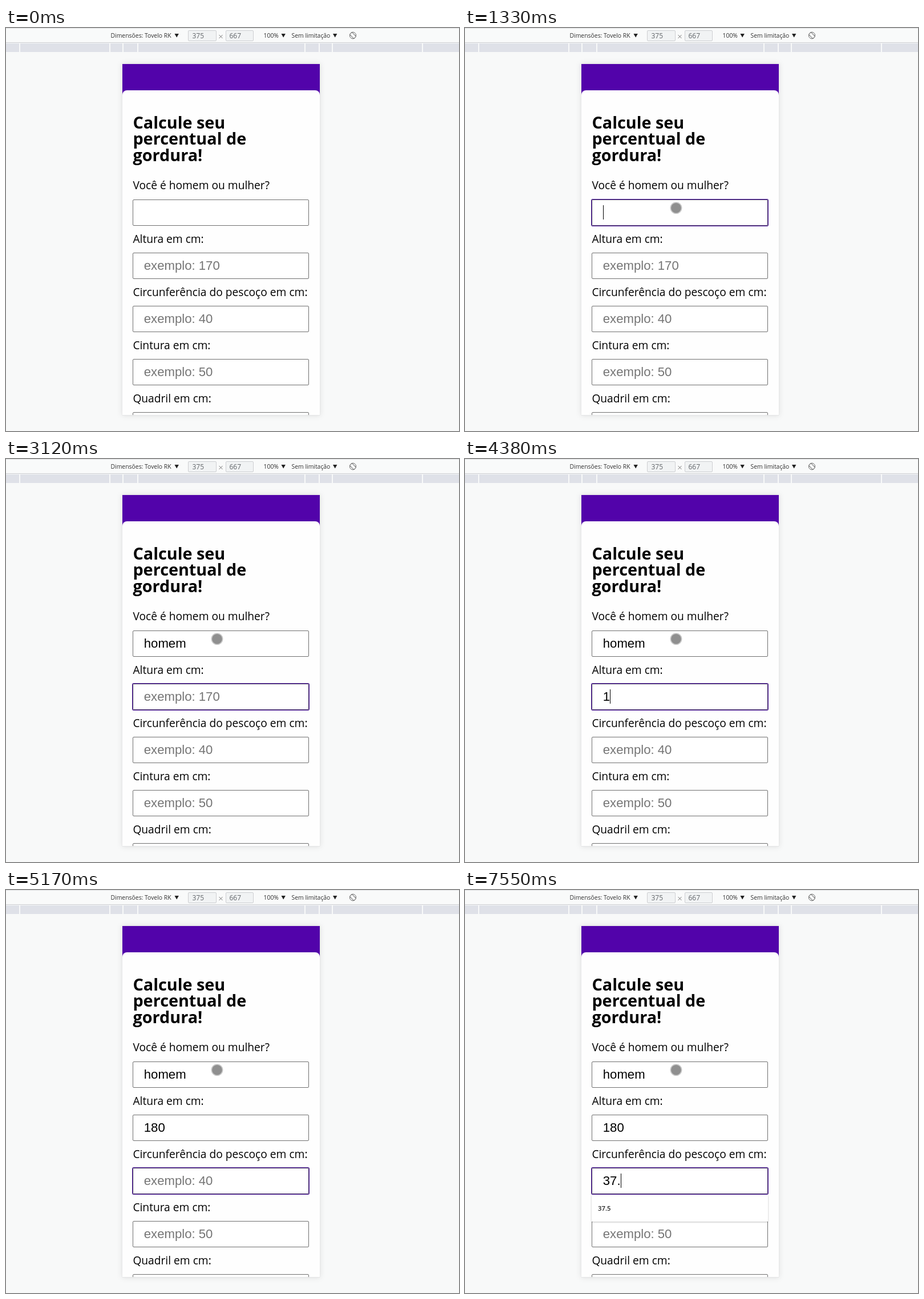
An HTML page that plays this animation: 794x705 px, repeating every 8000 ms.

```html
<!DOCTYPE html>
<html lang="pt">
<head>
<meta charset="utf-8">
<title>Percentual de gordura</title>
<style>
  html, body { margin: 0; width: 794px; height: 705px; overflow: hidden; background: #f8f9f9; }
  svg { display: block; }
  text { white-space: pre; }
  .bar, .hint { font-family: "Open Sans", sans-serif; }
  .bar { font-size: 10.4px; fill: #333; }
  .size { font-size: 12px; fill: #62666a; }
  .title { font: 700 28.8px "Open Sans", sans-serif; }
  .label { font: 400 19.2px "Open Sans", sans-serif; }
  .value { font: 400 22.15px "Liberation Sans", Arial, sans-serif; }
  .hint { font-size: 11.3px; font-weight: 600; fill: #222; }
  .phone { filter: drop-shadow(0 0 5px rgba(0, 0, 0, .11)); }
  .popup { filter: drop-shadow(0 1px 1.5px rgba(0, 0, 0, .25)); }
</style>
</head>
<body>
<svg id="stage" width="794" height="705" viewBox="0 0 794 705">
  <defs><clipPath id="screen"><path d="M204 63H550V677H204Z"/></clipPath></defs>
  <g id="toolbar">
    <path d="M0 0H794V25H0Z" fill="#f9fafa"/>
    <path d="M0 .5H794" stroke="#dfe1e3"/>
    <path d="M0 25.5H794" stroke="#cbcdd1"/>
    <path d="M0 27H794V42H0Z" fill="#dfe1e8"/>
    <g fill="#f1f3f4" stroke="#cdcfd2">
      <rect x="319.5" y="4.5" width="49" height="18" rx="1.5"/>
      <rect x="385.5" y="4.5" width="48" height="18" rx="1.5"/>
    </g>
    <g class="bar">
      <text x="183.5" y="17">Dimensões: Tovelo RK</text>
      <text x="451.5" y="17">100%</text>
      <text x="500.5" y="17">Sem limitação</text>
      <text class="size" x="326.5" y="17.5">375</text>
      <text class="size" x="391.5" y="17.5">667</text>
    </g>
    <path d="M373.5 12l6 6m0-6l-6 6" stroke="#777"/>
    <g fill="none" stroke="#6b6b6b">
      <path d="M604.8 8.2a5.6 5.6 0 0 1 8.6 6M611.2 17.8a5.6 5.6 0 0 1-8.6-6"/>
      <rect x="605.2" y="7.7" width="5.6" height="10.6" rx="1" transform="rotate(-45 608 13)"/>
    </g>
  </g>
  <path class="phone" d="M204 63H550V677.5H204Z" fill="#fff" stroke="#e4e5e6"/>
  <g id="page" clip-path="url(#screen)">
    <path d="M204 63H550V120H204Z" fill="#5203aa"/>
    <path d="M204 678V117a8 8 0 0 1 8-8H542a8 8 0 0 1 8 8V678Z" fill="#fefefe"/>
    <g class="title">
      <text x="222.4" y="176">Calcule seu</text>
      <text x="222.4" y="204">percentual de</text>
      <text x="222.4" y="233">gordura!</text>
    </g>
  </g>
</svg>
<script>
const LOOP = 8000, PITCH = 93, TOP = 300, LEFT = 241.8;
const stage = document.getElementById("stage");
const page = document.getElementById("page");

function add(parent, tag, attrs, text) {
  const el = document.createElementNS("http://www.w3.org/2000/svg", tag);
  for (const k in attrs) el.setAttribute(k, attrs[k]);
  if (text) el.textContent = text;
  parent.appendChild(el);
  return el;
}
function set(el, attrs) {
  for (const k in attrs) el.setAttribute(k, attrs[k]);
}
const show = (el, on) => el.setAttribute("visibility", on ? "visible" : "hidden");
// last row whose first item, a time, has been reached
const at = (rows, t) => rows.filter(r => r[0] <= t).pop();

const toolbar = document.getElementById("toolbar");
for (const x of [23, 181, 204, 230, 523, 548, 571, 729])
  add(toolbar, "rect", { x, y: 27, width: 2, height: 15, fill: "#f8f9f9" });
for (const x of [295.5, 482.5, 573])
  add(toolbar, "path", { d: `M${x} 10h7.4l-3.7 6.6z`, fill: "#222" });

const labels = ["Você é homem ou mulher?", "Altura em cm:",
  "Circunferência do pescoço em cm:", "Cintura em cm:", "Quadril em cm:"];
const holders = ["", "exemplo: 170", "exemplo: 40", "exemplo: 50", ""];
const fields = labels.map((label, i) => {
  const y = TOP + i * PITCH;
  add(page, "text", { class: "label", x: 222.4, y: i ? y - 17 : 282 }, label);
  add(page, "rect", { x: 222.5, y: y + .5, width: 308, height: 45, rx: 1.5, fill: "#fff", stroke: "#707070" });
  return add(page, "text", { class: "value", x: LEFT, y: y + 30 });
});

const ring = add(page, "g", {});
add(ring, "rect", { x: 221.5, y: 299.5, width: 310, height: 47, rx: 1.5, fill: "none", stroke: "#5b2aa6" });
add(ring, "rect", { x: 222.5, y: 300.5, width: 308, height: 45, rx: 1, fill: "none", stroke: "#3d2a5c" });
const caret = add(page, "rect", { width: 1, height: 25, fill: "#000" });

const popup = add(stage, "g", {});
const sheet = add(popup, "rect", { class: "popup", x: 222, width: 309, rx: 1, fill: "#fff" });
const hints = Array.from({ length: 5 }, () => add(popup, "text", { class: "hint", x: 233 }));
const dot = add(stage, "circle", { r: 9.7, fill: "#8f8f8f", stroke: "#c9c9c9", "stroke-width": 1.7 });

// time, field with focus
const focus = [[0, -1], [1330, 0], [2660, 1], [4710, 2]];
// time, text, one list per field
const typed = [
  [[0, ""], [1400, "h"], [2060, "ho"], [2260, "hom"], [2400, "home"], [2460, "homem"]],
  [[0, ""], [4380, "1"], [4510, "18"], [4580, "180"]],
  [[0, ""], [6880, "3"], [7010, "37"], [7480, "37."]]
];
// time, caret shown
const blink = [[0, 0], [1330, 1], [1860, 0], [2060, 1], [3120, 0], [3650, 1], [4120, 0],
  [4380, 1], [5170, 0], [5690, 1], [6160, 0], [6690, 1]];
// time, suggestions, opacity
const lists = [[0, "", 0], [1530, "homem", 1], [2530, "homem", .5], [2600, "", 0],
  [4450, "180 182 170 175 178", 1], [4510, "180 182", 1], [4580, "180 182", .5], [4640, "", 0],
  [7010, "37.5 37", 1], [7550, "37.5", 1]];
// pointer places, one per step
const path = [[774, 698], [773, 640], [770, 580], [764, 495], [750, 418], [685, 380], [628, 360],
  [580, 345], [532, 329], [495.5, 318.3], [473, 316], [460, 315.3], [454, 315]];

function movePointer(t) {
  const step = Math.floor((t - 70 + 7) / (800 / 12));
  let p = path[Math.max(0, Math.min(step, path.length - 1))];
  if (t >= 930) p = [402, 314.5];
  if (t >= 1000) p = [370, 314.8];
  set(dot, { cx: p[0], cy: p[1] });
  show(dot, t >= 70);
}

function drawPopup(t, field) {
  const [, words, alpha] = at(lists, t);
  show(popup, alpha > 0);
  const items = words ? words.split(" ") : [];
  const y = TOP + 47 + Math.max(0, field) * PITCH, h = 14 + 33 * items.length;
  const k = alpha < 1 ? .976 : 1;
  set(sheet, { y, height: h });
  set(popup, { opacity: alpha,
    transform: `translate(${376.5 * (1 - k)} ${(y + h / 2) * (1 - k)}) scale(${k})` });
  hints.forEach((el, i) => {
    el.textContent = items[i] || "";
    el.setAttribute("y", y + 28 + i * 33);
  });
}

function draw(t) {
  const field = at(focus, t)[1];
  fields.forEach((el, i) => {
    const text = typed[i] ? at(typed[i], t)[1] : "";
    el.textContent = text || holders[i];
    el.setAttribute("fill", text ? "#000" : "#757575");
  });
  show(ring, field >= 0);
  show(caret, field >= 0 && at(blink, t)[1]);
  if (field >= 0) {
    const el = fields[field];
    const filled = at(typed[field], t)[1] !== "";
    const w = filled ? el.getComputedTextLength() : 0;
    ring.setAttribute("transform", `translate(0 ${field * PITCH})`);
    set(caret, { x: Math.round(LEFT + w), y: 310 + field * PITCH });
  }
  drawPopup(t, field);
  movePointer(t);
}

const start = performance.now();
function tick() {
  draw((performance.now() - start) % LOOP);
  requestAnimationFrame(tick);
}
draw(0);
requestAnimationFrame(tick);
</script>
</body>
</html>
```
